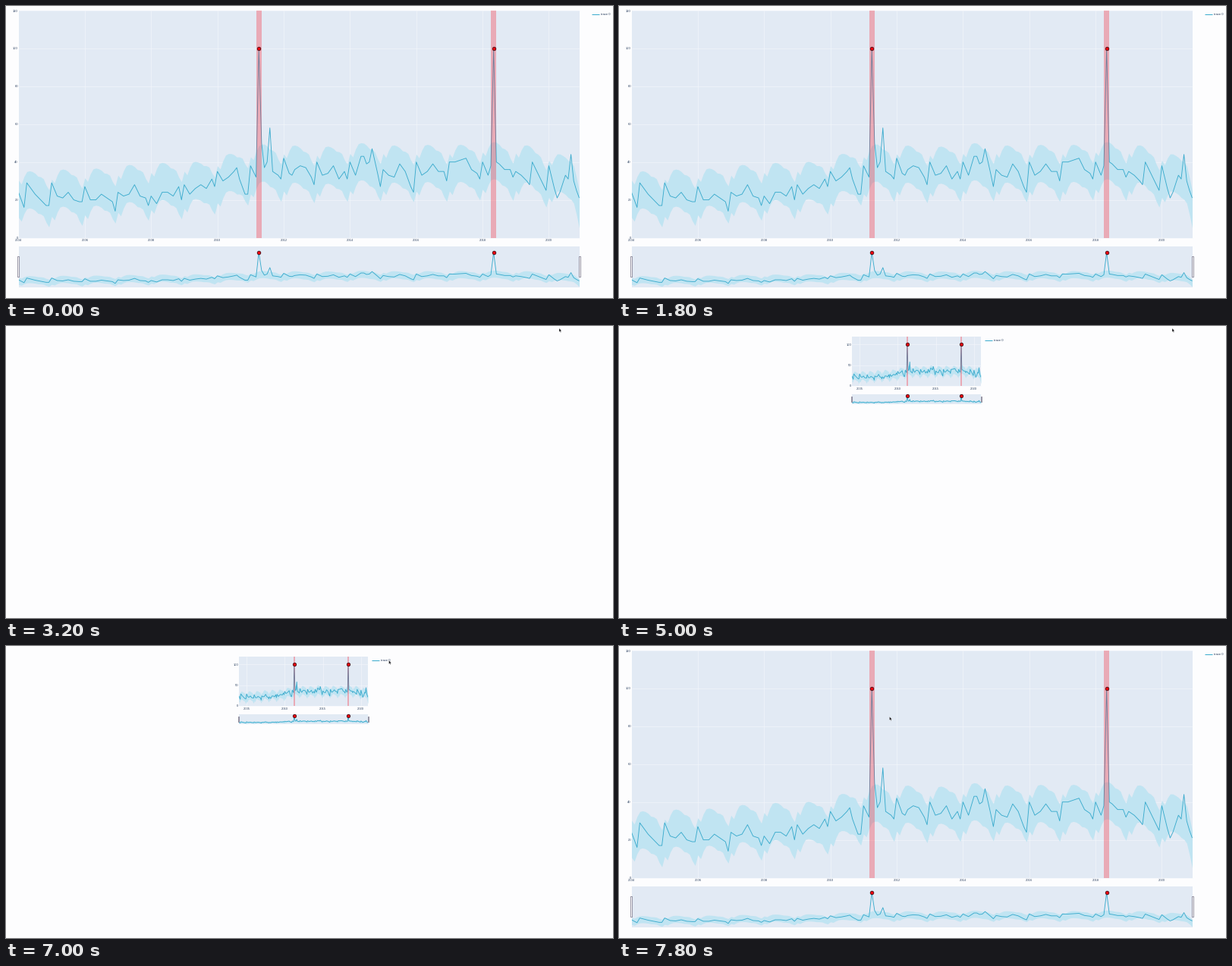
A matplotlib script that plays this animation: 800x385 px, repeating every 8000 ms.

```python
import numpy as np
import matplotlib.pyplot as plt
from matplotlib.animation import FuncAnimation
from matplotlib.patches import Polygon, Rectangle

W, H, DPI = 800, 385, 100
STEP, LOOP = 200, 8000
PAGE, PLOT, BAND, LINE, INK = "#fdfdfe", "#e2eaf4", "#c0e4f2", "#3aabcd", "#2a3f5f"
PX = 72 / DPI

plt.rcParams["font.family"] = "Liberation Sans"

# Yearly knots of the series, 2004 to 2020, at these months of the year
KNOT_MONTHS = np.array([0, 2, 4, 6, 8, 10, 11])
KNOTS = np.array([
    [24, 16, 27, 23, 20, 17, 17],
    [29, 22, 21, 24, 20, 19, 19],
    [27, 20, 20, 23, 21, 19, 14],
    [24, 22, 23, 28, 22, 21, 17],
    [22, 18, 24, 24, 22, 27, 20],
    [28, 23, 26, 28, 26, 31, 27],
    [35, 30, 32, 35, 31, 23, 23],
    [38, 32, 50, 40, 35, 33, 31],
    [42, 34, 36, 38, 37, 32, 28],
    [40, 33, 34, 38, 31, 35, 31],
    [40, 33, 43, 39, 47, 34, 27],
    [36, 33, 32, 39, 35, 27, 24],
    [40, 33, 35, 39, 35, 35, 30],
    [40, 40, 41, 42, 36, 34, 31],
    [40, 33, 100, 39, 36, 36, 32],
    [35, 33, 30, 40, 34, 28, 25],
    [38, 26, 24, 33, 44, 25, 21],
])
EXTRAS = {3: 29, 79: 37, 87: 100, 89: 37, 91: 58, 99: 33, 125: 43, 127: 40,
          171: 38, 173: 40, 185: 28, 195: 21, 199: 31, 201: 30}
SPIKES = (87, 172)

# Expected range: yearly trend plus a seasonal profile
TREND = [21.5, 22.5, 23, 25, 26, 26.5, 31, 36, 35, 34.5, 36.5, 35, 35.5, 35.5, 37, 35, 30]
SEASON = [-1, -3, 1, 3.6, 4, 3.6, 2.6, 1, 0.6, -0.5, -4, -6.5]
HALF = 9.8

month = np.arange(204)
knot_x = (12 * np.arange(17)[:, None] + KNOT_MONTHS).ravel()
points = dict(zip(knot_x, KNOTS.ravel())) | EXTRAS
keys = sorted(points)
value = np.interp(month, keys, [points[k] for k in keys])
center = np.interp(month, 12 * np.arange(17) + 5, TREND) + np.tile(SEASON, 17)
center[-4:] -= [0.5, 1.5, 4, 9]
center[-1] = 15

fig = plt.figure(figsize=(W / DPI, H / DPI), dpi=DPI, facecolor=PAGE)
ax = fig.add_axes([0, 0, 1, 1])
ax.set_xlim(0, W)
ax.set_ylim(H, 0)
ax.axis("off")


def box(x0, y0, x1, y1, **style):
    style = {"lw": 0, **style}
    return ax.add_patch(Rectangle((x0, y0), x1 - x0, y1 - y0, **style))


def stroke(x, y, width, color=LINE, z=3):
    return ax.plot(x, y, color=color, lw=width * PX, zorder=z,
                   solid_joinstyle="round", solid_capstyle="butt")[0]


def label(x, y, text, size, ha):
    return ax.text(x, y, text, fontsize=size * PX, color=INK, ha=ha,
                   va="center_baseline", zorder=8)


def series(x, zero, unit, clip, width, dot):
    """Band, line and spike dots in one panel."""
    def to_y(v):
        return zero - unit * v
    band = ax.fill_between(x, to_y(center - HALF), to_y(center + HALF),
                           color=BAND, lw=0, zorder=2)
    line = stroke(x, to_y(value), width)
    for art in (band, line):
        art.set_clip_path(clip)
    idx = list(SPIKES)
    dots = ax.plot(x[idx], to_y(value[idx]), "o", ms=dot * PX, mfc="#f5050f",
                   mec="#3a0a12", mew=0.8 * PX, zorder=6)[0]
    return [band, line, dots]


def chart(left, right, top, bottom, years, ticks, slider, slider_fit, grip,
          legend, width, dot, size, label_y):
    arts = []
    x = left + (right - left) * month / 203
    pitch = x[1] - x[0]
    unit = (bottom - top) / 120

    panel = box(left, top, right, bottom, fc=PLOT, zorder=0)
    arts.append(panel)
    for year in years:
        gx = left + 12 * (year - 2004) * pitch
        if gx > left + 1:
            arts.append(stroke([gx, gx], [top, bottom], 0.6, "#f4f7fb", 1))
        arts.append(label(gx, label_y, str(year), size, "center"))
    for tick in ticks:
        gy = bottom - unit * tick
        arts.append(stroke([left, right], [gy, gy], 0.6, "#f4f7fb", 1))
        arts.append(label(left - 0.6, gy, str(tick), size, "right"))
    arts += series(x, bottom, unit, panel, width, dot)
    for m in SPIKES:
        arts.append(box(x[m] - pitch, top, x[m] + pitch, bottom,
                        fc="#ff0010", alpha=0.27, zorder=4))

    mini = box(left, slider[0], right, slider[1], fc=PLOT, zorder=0)
    arts.append(mini)
    arts += series(x, *slider_fit, mini, width, dot)
    for gx in (left - 0.5, right + 0.5):
        arts.append(box(gx - 0.9, grip[0], gx + 0.9, grip[1], fc="white",
                        ec="#55506a", lw=0.6 * PX, zorder=7))

    lx, ly, length = legend
    arts.append(stroke([lx, lx + length], [ly, ly], 1))
    arts.append(label(lx + length + 1.5, ly, "trace 0", size, "left"))
    return arts


wide = chart(16.5, 755.5, 6, 305.5, range(2004, 2021, 2), range(0, 121, 20),
             (316.8, 371), (372.4, 0.474), (330, 357), (771.5, 10.5, 10.5),
             0.9, 4.6, 4.1, 308.5)
small = chart(307, 477, 13.5, 79, range(2005, 2021, 5), (0, 50, 100),
              (90, 103), (103.2, 0.114), (93, 100), (482.2, 18.5, 10),
              0.9, 4.4, 4.1, 82)

ARROW = np.array([(0, 0), (0, 4.7), (1.1, 3.8), (1.8, 5.5), (2.6, 5.1),
                  (1.9, 3.5), (3.3, 3.3)])
cursor = ax.add_patch(Polygon(ARROW, fc="#101014", ec="white", lw=0.3 * PX, zorder=10))

# Start time and what holds from then on
SCENES = [(0, wide), (2000, None), (5000, small), (7200, wide)]
POINTER = [(0, None), (3200, (729, 3)), (5800, None), (6200, (498.8, 3)),
           (6600, None), (7000, (504.6, 19)), (7200, (440.6, 139.8)),
           (7600, (440.3, 140.1)), (7800, (356.5, 93.2))]


def current(track, t):
    return [state for start, state in track if start <= t][-1]


def draw(i):
    t = i * STEP
    scene = current(SCENES, t)
    for arts in (wide, small):
        for art in arts:
            art.set_visible(arts is scene)
    tip = current(POINTER, t)
    cursor.set_visible(tip is not None)
    if tip is not None:
        cursor.set_xy(ARROW + tip)
    return [*wide, *small, cursor]


anim = FuncAnimation(fig, draw, frames=LOOP // STEP, interval=STEP,
                     repeat=True, repeat_delay=0, blit=False)
plt.show()
```
